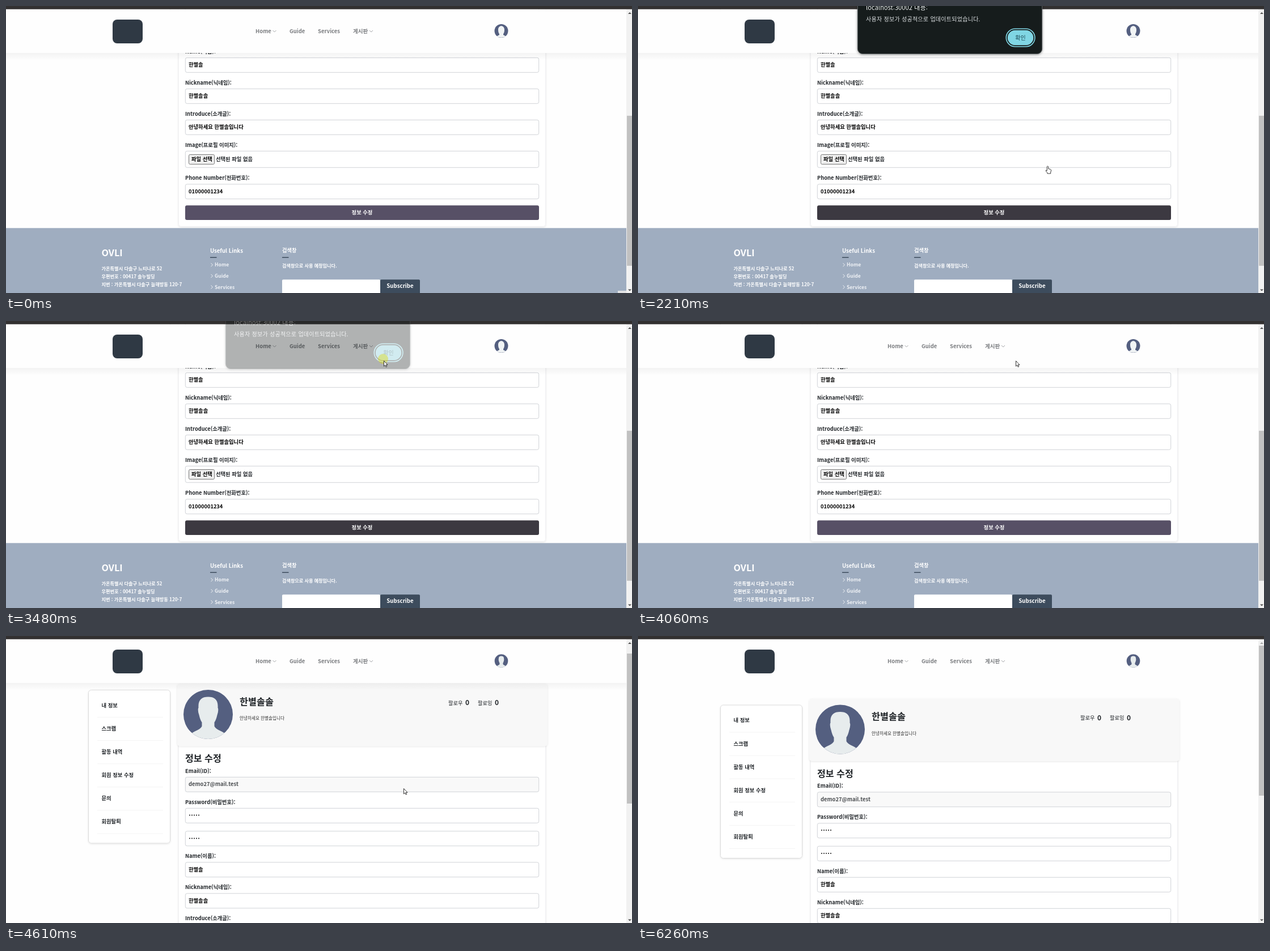
An HTML page for the animation above (6.53 s loop, 1104 by 507 pixels).

```html
<!DOCTYPE html>
<html lang="ko">
<head>
<meta charset="utf-8">
<style>
html, body { margin: 0; width: 100%; height: 100%; overflow: hidden; background: #fefefe; }
svg { display: block; width: 1104px; height: 507px; }
text { font-family: "Noto Sans CJK KR", "Noto Sans", sans-serif; white-space: pre; }
</style>
</head>
<body>
<svg id="stage" viewBox="0 0 1104 507"></svg>
<script>
const LOOP = 6530, STEP = 67.5, START_SCROLL = 335;
const INK = '#212529', NAVY = '#545f80', PALE = '#e7eced';

// y is the vertical middle of the glyphs
const text = (x, y, s, size = 9.3, weight = 700, fill = INK, extra = '') =>
  `<text x="${x}" y="${y + size * .37}" font-size="${size}" font-weight="${weight}" fill="${fill}" ${extra}>${s}</text>`;
const rect = (x, y, w, h, fill, r = 0, extra = '') =>
  `<rect x="${x}" y="${y}" width="${w}" height="${h}" rx="${r}" fill="${fill}" ${extra}/>`;
const line = (d, stroke, width = 1) =>
  `<path d="${d}" fill="none" stroke="${stroke}" stroke-width="${width}"/>`;
const field = (y, h = 26, fill = '#fff') => rect(316.3, y + .3, 623.4, h, fill, 3, 'stroke="#d0d3d7"');
const value = (y, s) => field(y) + text(322, y + 13, s, 9.3, 700, '#000');
const dots = y => [0, 1, 2, 3, 4].map(i => `<circle cx="${324 + i * 4}" cy="${y}" r=".95"/>`).join('');

const USER = '한별솔', NICK = '한별솔솔', HELLO = `안녕하세요 ${USER}입니다`;

const sidebar = rect(145.5, 122, 144, 270.5, '#fff', 5, 'stroke="#dcdcdc" filter="url(#soft)"') +
  ['내 정보', '스크랩', '활동 내역', '회원 정보 수정', '문의', '회원탈퇴'].map((s, i) => {
    const y = 149 + i * 41.1;
    return text(168.5, y, s) + line(`M161 ${y + 21}H277`, '#f4f4f4');
  }).join('');

const profile = rect(302, 110.5, 653, 110.5, '#f8f8f8', 5, 'filter="url(#soft)"') +
  '<use href="#avatar" x="356.5" y="165"/>' +
  text(412, 142, NICK, 16.3) + text(412, 172, HELLO, 7.6, 500, '#333') +
  text(780, 145, '팔로우', 9.3, 500) + text(810, 144.5, '0', 12) +
  text(832, 145, '팔로잉', 9.3, 500) + text(862, 144.5, '0', 12);

// the card's top edge lies hidden under the profile panel
const card = rect(304.5, 205, 647, 519.5, '#fff', 4, 'stroke="#f1f1f3" filter="url(#soft)"');

const form = text(316, 243, '정보 수정', 16.1) +
  [[265, 'Email(ID):'], [320, 'Password(비밀번호):'], [415.5, 'Name(이름):'],
   [470.5, 'Nickname(닉네임):'], [525.5, 'Introduce(소개글):'],
   [580.5, 'Image(프로필 이미지):'], [639, 'Phone Number(전화번호):']]
    .map(([y, s]) => text(316, y, s)).join('') +
  field(275.5, 26, '#f9f9f9') + text(322, 288.5, 'demo27@mail.test', 9.4, 700, '#4a4d50') +
  field(330.5) + dots(343) + field(371) + dots(384) +
  value(426, USER) + value(481, NICK) + value(536, HELLO) +
  field(591, 29) + rect(322.5, 597.5, 45, 17, '#efefef', 2, 'stroke="#777"') +
  text(327, 606, '파일 선택', 9.3, 700, '#000') + text(370, 606, '선택된 파일 없음') +
  value(649.5, '01000001234') +
  rect(316, 687.3, 624, 25.7, '#575066', 3, 'id="save"') +
  text(628, 700, '정보 수정', 9.3, 700, '#fff', 'text-anchor="middle"');

const footer = rect(0, 727.3, 1094, 181, '#9fadc0') +
  text(168.5, 770.5, 'OVLI', 16.3, 700, '#fff') +
  ['가온특별시 다솔구 느티나로 52', '우편번호 : 00417 솔누빌딩', '지번 : 가온특별시 다솔구 늘해방동 120-7']
    .map((s, i) => text(168.5, 798.5 + i * 14, s, 8.2, 700, '#fff')).join('') +
  text(360, 767, 'Useful Links', 9.6, 700, '#fff') + text(487, 767, '검색창', 9.2, 700, '#fff') +
  line('M360 779.3h11.5M487 779.3h11.5', '#3d4c5d', 1.4) +
  ['Home', 'Guide', 'Services'].map((s, i) => {
    const y = 792.3 + i * 19.6;
    return line(`M361.5 ${y - 3}l3 3l-3 3`, '#f3f5f8') + text(368, y, s, 8.6, 700, '#eef1f5');
  }).join('') +
  text(487, 794.5, '검색창으로 사용 예정입니다.', 8.1, 700, '#fff') +
  rect(487, 818.2, 173, 27, '#fff', 2) + rect(660, 818.2, 70, 27, '#3d4c5d', 2) +
  text(695, 829.5, 'Subscribe', 9.7, 700, '#fff', 'text-anchor="middle"');

const header = rect(0, 83, 1094, 13, 'url(#shade)', 0, 'id="shadow"') + rect(0, 6, 1094, 77, '#fefefe') +
  rect(188, 24, 53, 42, '#2f3944', 8) +
  [[440, 'Home'], [500, 'Guide'], [550, 'Services'], [612, '게시판']]
    .map(([x, s]) => text(x, 44, s, 9.5, 700, '#7b7d80')).join('') +
  line('M470.5 43l3 3l3-3M641 43l3 3l3-3', '#a5a7aa') +
  `<g id="oldFace"><circle cx="873.5" cy="44" r="12" fill="${NAVY}"/>
   <path fill="#f1f4f5" d="M868 42c0-9 11-9 11 0c0 4-1 6-2 7.500v1.500l4.500 2.500q-8 4.500-16 0l4.500-2.500v-1.500c-1-1.500-2-3.500-2-7.500z"/></g>
   <use id="newFace" href="#avatar" transform="translate(873.5 44) scale(.272)"/>`;

const scrollbar = rect(1094, 6, 10, 501, '#f1f1f1') + rect(1095, 17, 9, 265, '#c1c1c1', 0, 'id="thumb"') +
  '<path id="up" d="M1097 14l3-3l3 3z"/><path d="M1097 500.500l3 3l3-3z" fill="#505050"/>';

const dialog = rect(387.3, -12, 325.4, 96.6, '#181d1f', 9, 'stroke="#5b6062" filter="url(#deep)"') +
  text(402, 2.5, 'localhost:30002 내용:', 11.2, 400, '#eef1f2') +
  text(402, 23.5, '사용자 정보가 성공적으로 업데이트되었습니다.', 10, 400, '#dfe3e5', 'letter-spacing=".27"') +
  rect(649.3, 40.3, 50.6, 31.4, 'none', 15.7, 'stroke="#80d6e4" stroke-width="1.600"') +
  rect(651.8, 42.8, 45.6, 26.4, '#80d6e4', 13.2, 'id="ok"') +
  text(674.5, 56, '확인', 10, 400, '#1c4a55', 'text-anchor="middle"');

const $ = id => document.getElementById(id);
$('stage').innerHTML = `<defs>
  <filter id="soft"><feDropShadow dx="0" dy="1" stdDeviation="1.5" flood-opacity=".1"/></filter>
  <filter id="deep"><feDropShadow dx="0" dy="1" stdDeviation="2" flood-opacity=".4"/></filter>
  <linearGradient id="shade" x2="0" y2="1"><stop stop-opacity=".045"/><stop offset="1" stop-opacity="0"/></linearGradient>
  <clipPath id="disc"><circle r="43.500"/></clipPath>
  <g id="avatar"><circle r="43.500" fill="${NAVY}"/>
    <path clip-path="url(#disc)" fill="${PALE}" d="M-17-12C-18-26-11-31 0-31S18-26 17-12Q19-8 16 1Q14 10 11 14V21C14 28 26 29 32 36V45H-32V36C-26 29-14 28-11 21V14Q-14 10-16 1Q-19-8-17-12Z"/></g>
  </defs>` + rect(0, 0, 1104, 507, '#fefefe') +
  `<g id="page">${sidebar + card + profile + form + footer}</g>` + header + scrollbar +
  rect(1079, 503, 15, 4, '#e2e3e5', 0, 'id="status"') + rect(0, 0, 1104, 5.7, '#323030') +
  `<g id="dialog">${dialog}</g>
  <circle id="click" r="9" fill="#dbd700"/>
  <g id="cursor" fill="#fff" stroke="#222" stroke-width=".9" stroke-linejoin="round">
    <path id="arrow" d="M.5.500V10L2.700 8L4.200 11.300L5.700 10.600L4.200 7.400H7Z"/>
    <path id="hand" d="M-1.200 1.300Q0-.8 1.200 1.300V5L5 6Q6.300 6.400 6 8.500L5.200 11.500V13.500H-.6V12L-3.400 8.600Q-3.400 6.800-1.200 8.400Z"/>
  </g>`;

// start time, number of steps, end x, end y
const MOVES = [
  [0, 1, 1092, 497], [130, 10, 789, 379], [820, 1, 779.5, 371.5], [1940, 5, 722.5, 282.5],
  [2280, 4, 630, 110], [2550, 1, 634, 81], [2630, 7, 665, 66], [3400, 1, 666, 70],
  [4120, 4, 701, 269], [5660, 6, 1084, 492], [6140, 2, 1084, 501]
];

const clamp = v => Math.max(0, Math.min(1, v));
const stepped = (t, start, n) => clamp((Math.floor((t - start) / STEP) + 1) / n);
const show = (id, on) => $(id).setAttribute('visibility', on ? 'visible' : 'hidden');
const set = (id, name, v) => $(id).setAttribute(name, v);

function pointer(t) {
  const i = MOVES.findLastIndex(m => m[0] <= t);
  const [start, n, x, y] = MOVES[i], [, , px, py] = MOVES[Math.max(0, i - 1)];
  const p = stepped(t, start, n);
  return [px + (x - px) * p, py + (y - py) * p];
}

function draw(t) {
  const scroll = START_SCROLL * (1 - stepped(t, 4330, 6)) ** 1.416;
  set('page', 'transform', `translate(0 ${-scroll})`);
  set('thumb', 'y', 17 + scroll * .528);
  set('up', 'fill', scroll ? '#505050' : '#a3a3a3');
  show('shadow', scroll > 0);
  show('status', t < 130);
  show('oldFace', t < 4330);
  show('newFace', t >= 4330);

  set('save', 'fill', t >= 820 && t < 3530 ? '#3c3941' : '#575066');
  set('dialog', 'opacity', stepped(t, 1560, 3) - stepped(t, 3400, 3));
  set('ok', 'fill', t >= 2830 ? '#7ac8d5' : '#80d6e4');

  const second = t >= 3330, age = t - (second ? 3330 : 1360);
  set('click', 'cx', second ? 665 : 779.5);
  set('click', 'cy', second ? 67 : 373);
  set('click', 'opacity', age < 0 ? 0 : .6 * (1 - stepped(age, 140, 3)));

  const hand = t >= 820 && t < 2550, visible = t >= 130 && t < 6260;
  set('cursor', 'transform', `translate(${pointer(t)})`);
  show('hand', visible && hand);
  show('arrow', visible && !hand);
}

function tick() {
  draw(performance.now() % LOOP);
  requestAnimationFrame(tick);
}
tick();
</script>
</body>
</html>
```
